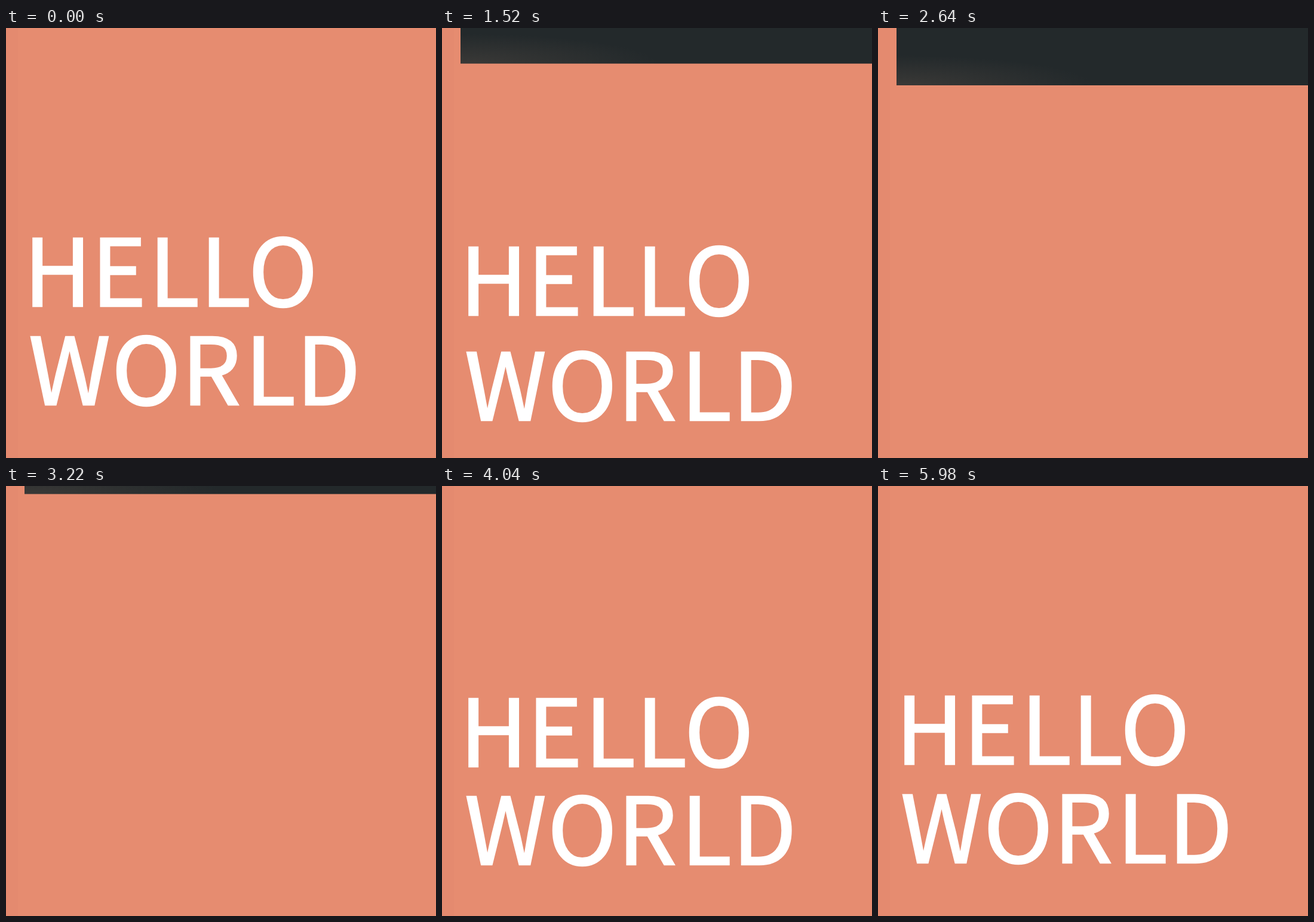
Animation, 720 px wide and 720 px high, one loop 6 s. Source, as an HTML page:

```html
<!DOCTYPE html>
<html lang="en">
<head>
<meta charset="utf-8">
<title>Hello World</title>
<style>
  html, body { margin: 0; width: 100%; height: 100%; overflow: hidden; background: #e68c70; }
  svg { display: block; width: 100vw; height: 100vh; }
  text {
    font: 400 156px "Noto Sans CJK JP", "Noto Sans CJK SC", "Noto Sans CJK", Roboto, sans-serif;
    fill: #fff;
    stroke: #fff;
    stroke-width: 2.6px;
    text-anchor: middle;
  }
</style>
</head>
<body>
<svg viewBox="0 0 720 720">
  <defs>
    <clipPath id="upper"><rect x="0" y="330" width="720" height="201"/></clipPath>
    <clipPath id="lower"><rect x="0" y="495" width="720" height="201"/></clipPath>
    <radialGradient id="glow" gradientUnits="userSpaceOnUse" cx="0" cy="0" r="1"
      gradientTransform="translate(31 0) scale(330 50)">
      <stop offset="0" stop-color="#3a3937"/>
      <stop offset="1" stop-color="#23292b"/>
    </radialGradient>
  </defs>
  <rect width="720" height="720" fill="#e68c70"/>
  <rect width="20" height="720" fill="#e48a6f"/>
  <rect id="bar" x="31" y="-140" width="689" height="140" fill="url(#glow)"/>
  <g clip-path="url(#upper)"><text id="hello" x="86.5 189 281.5 367.5 464" y="465.7">HELLO</text></g>
  <g clip-path="url(#lower)"><text id="world" x="106.5 235 343.5 442.5 540" y="630.7">WORLD</text></g>
</svg>
<script>
  const LOOP = 6000;
  const TRAVEL = 184;
  const BAR = { start: 910, length: 2580, height: 130 };
  const lines = [
    { id: 'hello', leave: 1120, enter: 3285 },
    { id: 'world', leave: 1060, enter: 3220 },
  ].map(line => ({ ...line, node: document.getElementById(line.id) }));
  const bar = document.getElementById('bar');

  const progress = (t, start, length) => Math.min(1, Math.max(0, (t - start) / length));
  const easeIn = p => p ** 4;
  const easeOut = p => p >= 1 ? 1 : 1 - 2 ** (-10 * p);
  const shift = (node, y) => node.setAttribute('transform', `translate(0 ${y.toFixed(2)})`);

  function lineOffset(t, { leave, enter }) {
    return t < enter
      ? TRAVEL * easeIn(progress(t, leave, 750))
      : TRAVEL * (1 - easeOut(progress(t, enter, 1380)));
  }

  function render(t) {
    const phase = 2 * Math.PI * progress(t, BAR.start, BAR.length);
    shift(bar, BAR.height * (1 - Math.cos(phase)) / 2);
    for (const line of lines) shift(line.node, lineOffset(t, line));
  }

  const origin = performance.now();
  function tick() {
    render((performance.now() - origin) % LOOP);
    requestAnimationFrame(tick);
  }
  render(0);
  requestAnimationFrame(tick);
</script>
</body>
</html>
```
